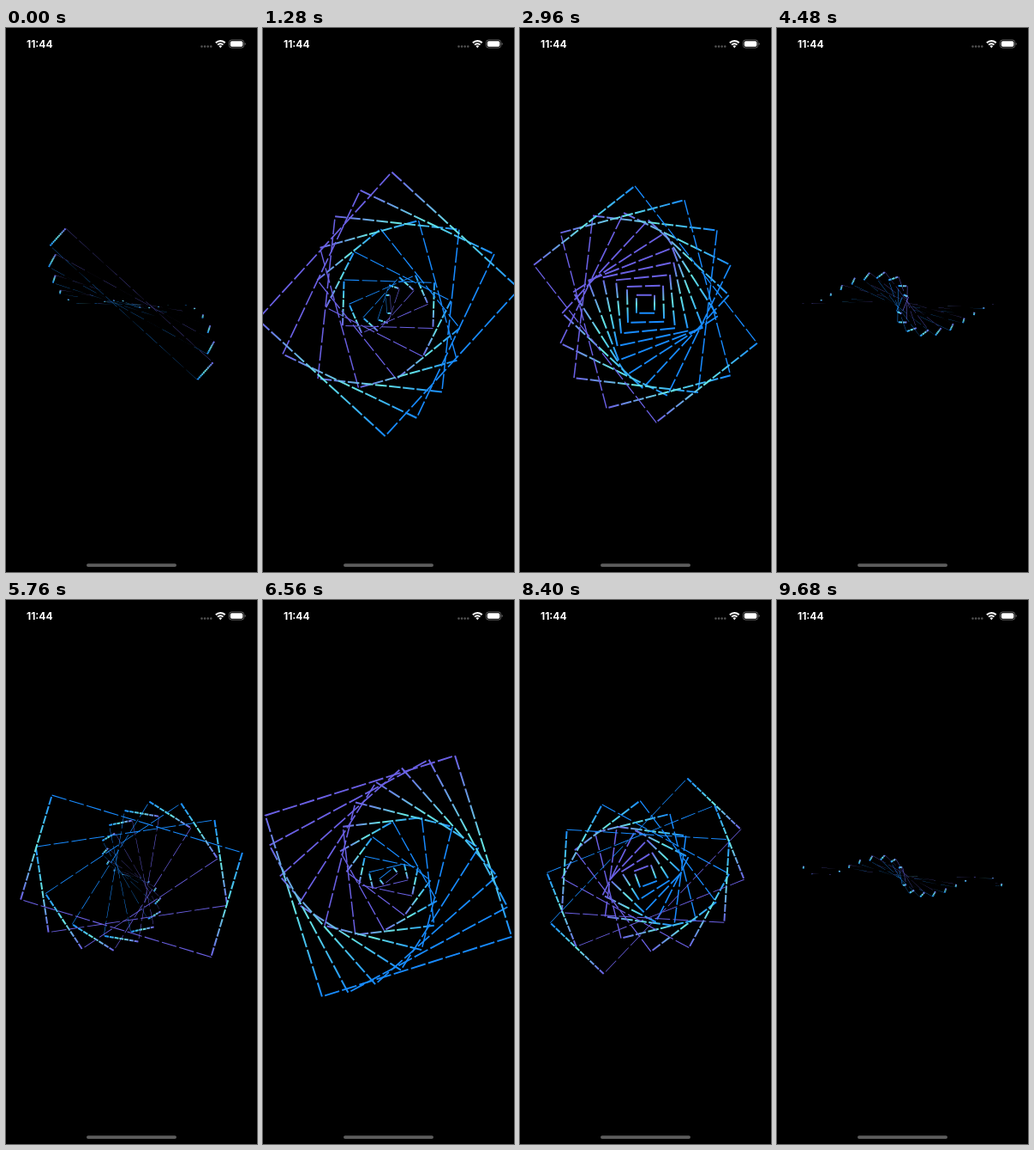
Animation, 293 px wide and 633 px high, one loop 9760 ms. Source, as an HTML page:

```html
<!DOCTYPE html>
<html lang="en">
<head>
<meta charset="utf-8">
<style>
  html, body { margin: 0; height: 100%; background: #000; overflow: hidden; }
  svg { display: block; width: 100%; height: 100%; }
  text { font: 700 12px Inter, sans-serif; fill: #fff; }
</style>
</head>
<body>
<svg viewBox="0 0 293 633">
  <linearGradient id="tint" x2="0" y2="1">
    <stop stop-color="#6a5fe4"/>
    <stop offset=".5" stop-color="#66e6e2"/>
    <stop offset="1" stop-color="#178aff"/>
  </linearGradient>

  <g id="squares" fill="none" stroke="url(#tint)" stroke-width="2" stroke-dasharray="17.7 3.4"></g>

  <text x="24" y="23">11:44</text>
  <path d="M228.5 21.5h12" stroke="#555" stroke-width="2.6" stroke-linecap="round" stroke-dasharray="0 3.6"/>
  <g fill="none" stroke="#fff" stroke-width="2">
    <path d="M244.9 17.2a7.6 7.6 0 0 1 10.8 0M247.1 19.6a4.5 4.5 0 0 1 6.4 0"/>
    <path d="M248.4 21.1a2.7 2.7 0 0 1 3.8 0L250.3 23.3z" fill="#fff" stroke="none"/>
  </g>
  <rect x="260.5" y="13.9" width="17.2" height="9.2" rx="2.8" fill="none" stroke="#777" stroke-width=".8"/>
  <rect x="261.8" y="15.2" width="14.6" height="6.6" rx="1.7" fill="#fff"/>
  <path d="M278.7 17v3q1-.4 1-1.5t-1-1.5" fill="#777"/>
  <rect x="94" y="623.2" width="105" height="3.8" rx="1.9" fill="#5c5c5c"/>
</svg>
<script>
const COUNT = 11, UNIT = 21.1;
const LOOP = 9760, STEP = 80;
const HALF = 2517, LAG = 102.5, START = 527;

const group = document.getElementById('squares');
const squares = Array.from({ length: COUNT }, (_, i) => {
  const rect = document.createElementNS('http://www.w3.org/2000/svg', 'rect');
  const size = (i + 1) * UNIT;
  const attrs = { x: -size / 2, y: -size / 2, width: size, height: size };
  for (const key in attrs) rect.setAttribute(key, attrs[key]);
  return group.appendChild(rect);
});

// cubic-bezier(.42, 0, .58, 1), solved by bisection
function easeInOut(x) {
  let lo = 0, hi = 1, s = .5;
  for (let i = 0; i < 24; i++) {
    s = (lo + hi) / 2;
    const at = 1.26 * s * (1 - s) ** 2 + 1.74 * s * s * (1 - s) + s ** 3;
    if (at < x) lo = s; else hi = s;
  }
  return s * s * (3 - 2 * s);
}

// Each square swings 0 → 1 → 0; larger ones run ahead.
function progress(time, n) {
  const turn = (((time - START + LAG * n) / HALF) % 2 + 2) % 2;
  return easeInOut(turn > 1 ? 2 - turn : turn);
}

function draw(now) {
  const time = Math.floor(now % LOOP / STEP) * STEP;
  squares.forEach((rect, i) => {
    const p = progress(time, i + 1);
    rect.setAttribute('transform', `translate(146.5 321.3) rotate(${360 * p}) scale(1 ${p})`);
  });
}

const begin = performance.now();
function tick() {
  draw(performance.now() - begin);
  requestAnimationFrame(tick);
}
tick();
</script>
</body>
</html>
```
